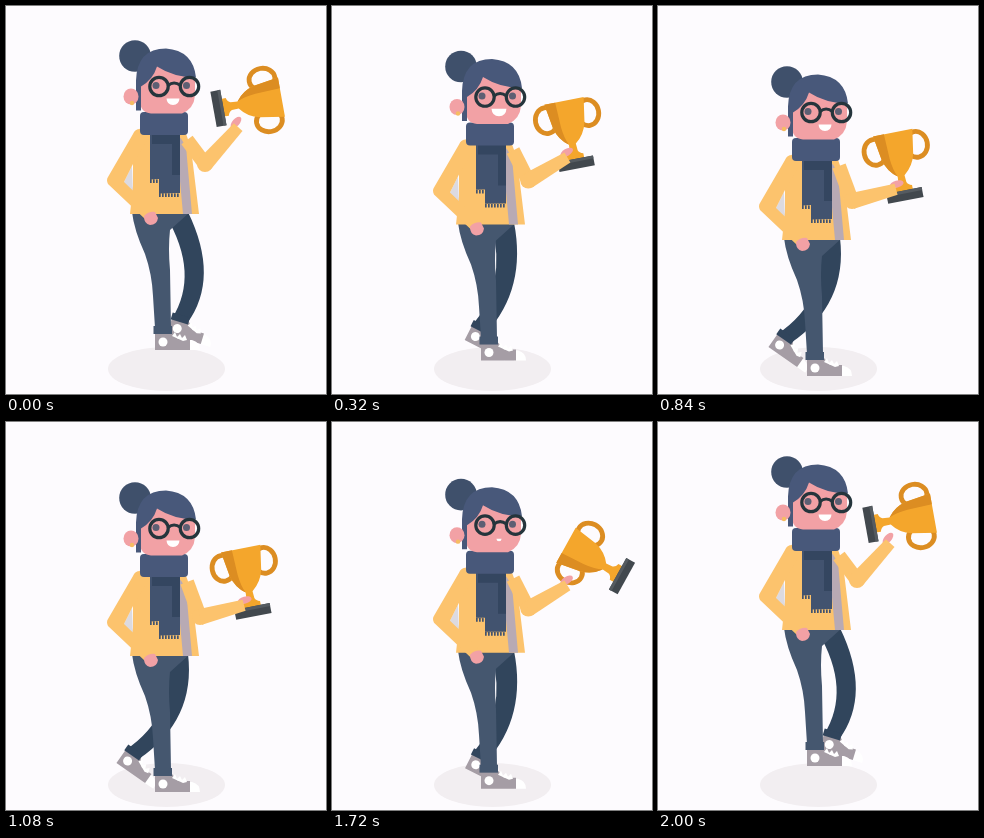
These frames come from a looping animation (320 px wide and 388 px high, 2.04 s). An HTML page with a canvas:

```html
<!DOCTYPE html>
<html lang="en">
<head>
<meta charset="utf-8">
<title>Trophy toss</title>
<style>
html, body { margin: 0; width: 100%; height: 100%; overflow: hidden; background: #fdfbfe; }
canvas { display: block; width: 320px; height: 388px; }
</style>
</head>
<body>
<canvas id="stage" width="320" height="388"></canvas>
<script>
const g = document.getElementById('stage').getContext('2d');
const LOOP = 2040, STEP = 40, CATCH = 2000, DEG = Math.PI / 180;
const NAVY = '#48587a', SCARF = '#42536f', DARK = '#344660', JEANS = '#45576f', REAR = '#31455c',
  COAT = '#fcc36d', SKIN = '#f2a1a5', SHOE = '#a59da5', FRAME = '#25353c', GOLD = '#f4a62c', BRONZE = '#dc8d22';

const ramp = (t, a, b) => Math.min(1, Math.max(0, (t - a) / (b - a)));
const smooth = u => u * u * (3 - 2 * u);
const easeOut = u => u * (2 - u);
const bump = (t, a, b) => Math.sin(Math.PI * ramp(t, a, b));

// The whole pose follows from the time since the catch.
function poseAt(t) {
  const air = t < 1000 ? 1 - smooth(ramp(t, 0, 600)) : easeOut(ramp(t, 1620, CATCH));
  const height = t < 1000 ? 1 - ramp(t, 40, 480) ** 2 : easeOut(ramp(t, 1700, CATCH));
  const wrist = [238 - 6 * air, 183 - 36 * air];
  const toss = t < 1000 ? t + CATCH : t; // the throw runs on across the loop's seam
  return {
    air, wrist,
    elbow: [194 + 5 * air, 195 - 11 * air],
    lift: 4 * bump(t, 1440, 1720) - 26 * height,
    mouth: 1 + .15 * bump(t, 0, 640) - .6 * bump(t, 1480, 1960),
    cup: [
      wrist[0] + 3 + 25 * Math.sin(Math.PI * Math.sqrt(ramp(toss, 1630, 2090))),
      wrist[1] - 24 - 14 * bump(toss, 1740, CATCH),
      -11 - 360 * smooth(ramp(toss, 1570, 2210))
    ]
  };
}

function fill(d, color) {
  g.fillStyle = color;
  g.fill(new Path2D(d));
}
function line(d, color, width) {
  g.strokeStyle = color;
  g.lineWidth = width;
  g.stroke(new Path2D(d));
}
function oval(x, y, rx, ry, color, turn = 0) {
  g.fillStyle = color;
  g.beginPath();
  g.ellipse(x, y, rx, ry, turn, 0, 7);
  g.fill();
}
function ring(x, y, rx, ry, color, width) {
  g.strokeStyle = color;
  g.lineWidth = width;
  g.beginPath();
  g.ellipse(x, y, rx, ry, 0, 0, 7);
  g.stroke();
}
function place(x, y, deg, draw) {
  g.save();
  g.translate(x, y);
  g.rotate(deg * DEG);
  draw();
  g.restore();
}

function shoe() {
  fill('M25 6h4q8 2 8 10H25z', '#fff');
  fill('M-8-2H9L15 5H27V16H-8z', SHOE);
  fill('M9 2 12-2 14 3 17 0 19 4 22 1 24 6 20 7z', '#fff');
  oval(0, 8, 4.5, 4.5, '#fff');
}

// Swings from the hip; the knee bends most in the air.
function rearLeg(air) {
  const swing = 23 - 26 * air, deg = 19 + .7 * swing, knee = 180 + 24 * air * air;
  const x = 168 - 107 * Math.sin(swing * DEG), y = 234 + 107 * Math.cos(swing * DEG);
  const c = 8 * Math.cos(deg * DEG), s = 8 * Math.sin(deg * DEG);
  place(x, y, deg, shoe);
  fill(`M155 232H182Q${knee + 10} 298 ${x + c} ${y + s}L${x - c} ${y - s}Q${knee - 10} 294 160 236z`, REAR);
  place(x, y, deg, () => fill('M-9-6H9V1H-9z', REAR));
}

function frontLeg() {
  place(157, 354, 0, shoe);
  fill('M126 232H184L164 250Q162 268 164 290L165 348H149L147 316Q146 294 139 274Q128 250 126 232z', JEANS);
  fill('M147.5 346H166V354H147.5z', JEANS);
}

function trophy() {
  for (const side of [-1, 1]) ring(side * 21, -17, 11, 13, BRONZE, 4.8);
  fill('M-20-33H20L16-8Q13 4 3.5 11L4 18Q5 21 9 22V27H-9V22Q-5 21-4 18L-3.5 11Q-13 4-16-8z', GOLD);
  fill('M-20-33H-9L-8-8Q-7 4-3.5 11-13 4-16-8z', BRONZE);
  fill('M-18 26H18V36H-18z', '#42484e');
  fill('M-18 26H18V29H-18z', '#555b61');
}

function fringe(x, end, y) {
  let d = `M${x} ${y - 4}`;
  for (; x < end; x += 3) d += `V${y}H${x + 1.7}V${y - 3.5}H${x + 3}`;
  fill(d + 'z', SCARF);
}

function torso() {
  fill('M126 186 117 204 127 213z', '#dcdae0');
  fill('M134 148H178L185 168 193 234H124L127 206 127 180z', COAT);
  fill('M170 154Q181 162 181 178L186 234H177L173 190z', '#b8aab4');
  // far sleeve, bent at the elbow
  fill('M134 149Q142 149 143 157L127 184 118 202 146 229 139 239 102 204Q100 200 102 197L127 154Q129 149 134 149z', COAT);
  fill('M138 236Q143 231 149 232L152 238Q151 245 144 245Q138 244 138 236z', SKIN);
  fill('M144 150H174V213H153V199H144z', SCARF);
  fringe(144, 152, 203);
  fringe(153, 173, 217);
  fill('M146 154H174V195H166V164H146z', DARK);
}

function head(mouth) {
  g.fillStyle = NAVY;
  g.beginPath();
  g.roundRect(134, 133.5, 48, 23, 4);
  g.fill();
  oval(129, 77.5, 15.8, 15.8, '#3f506b');
  fill('M134 86H160L189 96V117Q188 130 176 135H145Q134 134 134 122z', SKIN);
  fill('M130 132V102Q131 70 160 70Q187 72 190 99Q168 99 151 88Q147 101 135 108V132z', NAVY);
  oval(125, 118, 7.5, 8, SKIN);
  oval(126, 124.5, 2.2, 2.2, '#f6bd62');
  for (const x of [153, 183.5]) {
    oval(x - 3, 107, 3.5, 3.5, '#5d5f73');
    ring(x, 108, 9.2, 9.2, FRAME, 3.2);
  }
  line('M162 107Q168 102 174.5 107', FRAME, 3);
  place(167, 122.5, 0, () => {
    g.scale(mouth, mouth);
    fill('M-6.5-2.5H6.5Q6 4 0 4T-6.5-2.5z', '#fff');
  });
}

function arm([ex, ey], [wx, wy]) {
  const turn = Math.atan2(wy - ey, wx - ex), c = Math.cos(turn), s = Math.sin(turn);
  const edge = (x, y, r) => `${x - r * s} ${y + r * c}`;
  oval(wx + 2 * c + 4.5 * s, wy + 2 * s - 4.5 * c, 7, 3.6, SKIN, turn);
  line(`M181 160L${ex} ${ey}`, COAT, 14);
  oval(ex, ey, 8, 8, COAT);
  fill(`M${edge(ex, ey, 8)}L${edge(wx, wy, 6)}L${edge(wx, wy, -5.5)}L${edge(ex, ey, -8)}z`, COAT);
}

function draw(now) {
  const t = Math.floor(now % LOOP / STEP) * STEP;
  const pose = poseAt(t), [x, y, deg] = pose.cup;
  g.fillStyle = '#fdfbfe';
  g.fillRect(0, 0, 320, 388);
  oval(160.5, 363, 58.5, 22, '#f2eef1');
  place(0, pose.lift, 0, () => {
    rearLeg(pose.air);
    frontLeg();
    torso();
    place(0, -1.5, 0, () => head(pose.mouth));
    place(x, y, deg, trophy);
    arm(pose.elbow, pose.wrist);
  });
}

let start;
function tick(now) {
  start ??= now;
  draw(now - start);
  requestAnimationFrame(tick);
}
draw(0);
requestAnimationFrame(tick);
</script>
</body>
</html>
```
